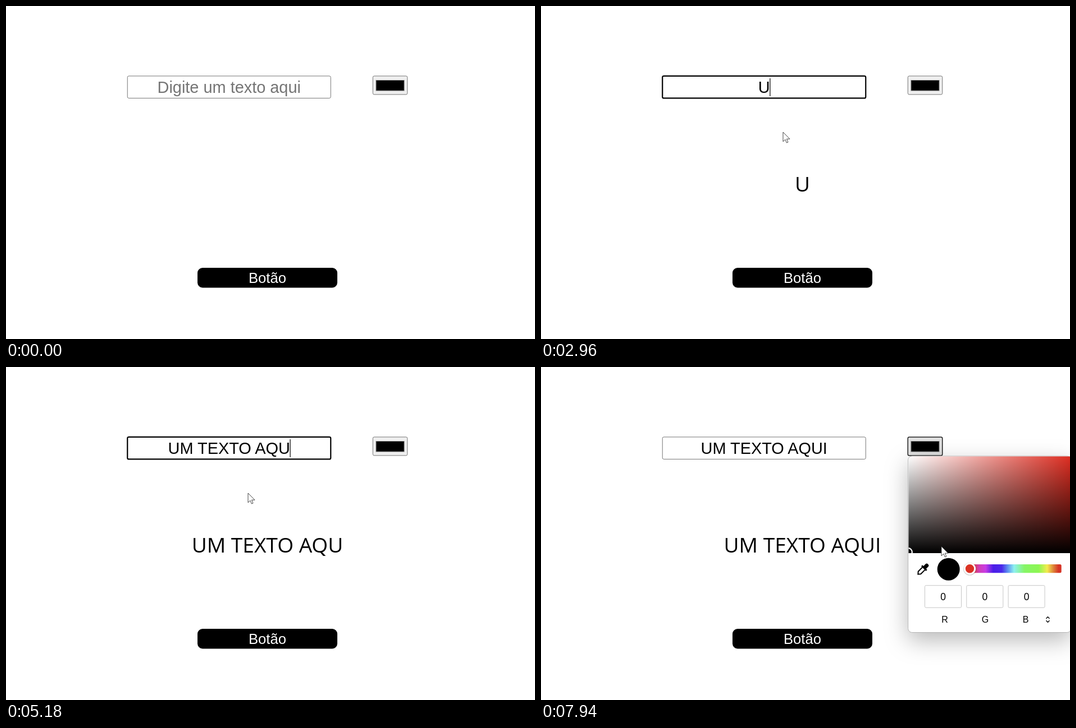
An HTML page for the animation above (8000 ms loop, 942 by 594 pixels).

```html
<!DOCTYPE html>
<html lang="pt">
<head>
<meta charset="utf-8">
<title>Texto e cor</title>
<style>
  html, body { margin: 0; width: 100%; height: 100%; overflow: hidden; background: #fff; }
  svg { display: block; width: 942px; height: 594px; }
  text { font-family: "Liberation Sans", Arial, sans-serif; text-anchor: middle; white-space: pre; }
  #value { font-size: 28.9px; }
  #output { font-family: "Open Sans", "Segoe UI", sans-serif; font-size: 37.1px; }
  .digit { font-size: 17.5px; }
  .label { font-size: 16px; }
  .panel { filter: drop-shadow(0 14px 20px rgba(0, 0, 0, .28)); }
</style>
</head>
<body>
<svg viewBox="0 0 942 594">
  <defs>
    <linearGradient id="sat">
      <stop stop-color="#fff"/><stop offset="1" stop-color="#de2e22"/>
    </linearGradient>
    <linearGradient id="dark" x2="0" y2="1">
      <stop stop-color="#000" stop-opacity="0"/><stop offset="1" stop-color="#000"/>
    </linearGradient>
    <linearGradient id="hue">
      <stop offset=".06" stop-color="#d93a2c"/>
      <stop offset=".13" stop-color="#d03fb4"/>
      <stop offset=".2" stop-color="#c83ce6"/>
      <stop offset=".28" stop-color="#4a1de8"/>
      <stop offset=".37" stop-color="#4a28ea"/>
      <stop offset=".43" stop-color="#5c8cf0"/>
      <stop offset=".5" stop-color="#8ef0f0"/>
      <stop offset=".61" stop-color="#86f566"/>
      <stop offset=".76" stop-color="#8cf652"/>
      <stop offset=".85" stop-color="#f3ec4e"/>
      <stop offset=".92" stop-color="#dd7c38"/>
      <stop offset=".97" stop-color="#d63426"/>
    </linearGradient>
    <clipPath id="area"><path d="M654.5 332V166q0-6.500 6.500-6.500H943V332z"/></clipPath>
  </defs>

  <rect id="field" x="216.250" y="124.900" width="362" height="39.500" rx="2.500" fill="#fff"/>
  <text id="value" x="397.250" y="155"></text>
  <rect id="caret" y="129" width="1.200" height="32"/>

  <rect id="well" x="653.250" y="124.900" width="61.500" height="33" rx="2.500"/>
  <rect x="659" y="132.500" width="50" height="18.500" stroke="#777"/>

  <text id="output" x="465.500" y="331.300"></text>

  <rect x="341" y="467" width="249" height="35.500" rx="9"/>
  <text x="465.500" y="493.700" font-size="25.600" fill="#fff">Botão</text>

  <g id="picker">
    <rect class="panel" x="653.700" y="159" width="290" height="314.500" rx="7" fill="#fff"/>
    <rect x="653.700" y="159" width="290" height="314.500" rx="7" fill="#fff" stroke="#b4b4b4"/>
    <g clip-path="url(#area)">
      <rect x="654" y="159" width="289" height="173" fill="url(#sat)"/>
      <rect x="654" y="159" width="289" height="173" fill="url(#dark)"/>
      <circle cx="654" cy="330" r="6.800" fill="none" stroke="#fff" stroke-width="2.200"/>
    </g>
    <g transform="translate(680 361) rotate(45)">
      <path d="M-3.200 -2V8.500L0 12.200L3.200 8.500V-2" fill="#fff" stroke="#000" stroke-width="2"/>
      <path d="M-6 -4.800H6V-1.800H-6zM-3.400 -4.500V-10q0-3 3.400-3t3.400 3V-4.500z"/>
    </g>
    <circle cx="725.700" cy="360.700" r="20"/>
    <rect x="758" y="352" width="168.700" height="15.300" rx="2.500" fill="url(#hue)"/>
    <circle cx="763.500" cy="360.300" r="11.500" fill="#000" opacity=".18"/>
    <circle cx="763.500" cy="359.700" r="9.200" fill="#da3223" stroke="#fff" stroke-width="3"/>
    <g id="channels"></g>
    <path d="M899.500 448.700L902.500 445.700L905.500 448.700M899.500 452.300L902.500 455.300L905.500 452.300" fill="none" stroke="#000" stroke-width="1.400"/>
  </g>

  <circle id="click" r="12" fill="#f5ef31" opacity=".88"/>
  <g id="mouse">
    <path id="arrow" d="M0 0V16.800L3.900 13.200L6.400 19L8.900 18L6.500 12.200H12z" fill="#fff" stroke="#333" stroke-width=".9"/>
    <path id="beam" d="M-4.500 -7.500H-1.500L0 -6.500L1.500 -7.500H4.500M-4.500 8H-1.500L0 7L1.500 8H4.500M0 -6.500V7" fill="none" stroke="#222" stroke-width="1.200"/>
  </g>
</svg>
<script>
const LOOP = 8000;
const PHRASE = 'UM TEXTO AQUI';
const KEYS = [2960, 3090, 3220, 3360, 3620, 3890, 4160, 4220, 4360, 4490, 4780, 5180, 5440];
const FOCUS = 1760, BLUR = 6895, BLINK = 530;

const $ = id => document.getElementById(id);
const show = (id, on) => $(id).setAttribute('visibility', on ? 'visible' : 'hidden');
const set = (id, attrs) => {
  for (const k in attrs) $(id).setAttribute(k, attrs[k]);
};
const clamp = v => Math.min(1, Math.max(0, v));
const between = (v, a, b) => v >= a && v < b;

const outQuad = p => p * (2 - p);
const inOut = p => p * p * (3 - 2 * p);

// Each move: start, end, easing, then a quadratic curve
const MOVES = [
  [930, 1690, inOut, [829, 322], [620, 240], [465, 152]],
  [1850, 2280, outQuad, [465, 152], [452, 200], [431, 225]],
  [5985, 6740, inOut, [431, 225], [500, 245], [667, 141]],
  [7510, 7940, inOut, [667, 141], [676, 235], [713, 320]]
];

function mouseAt(t) {
  const move = MOVES.filter(m => t >= m[0]).pop() || MOVES[0];
  const [start, end, ease, a, b, c] = move;
  const p = ease(clamp((t - start) / (end - start))), q = 1 - p;
  return a.map((v, i) => q * q * v + 2 * q * p * b[i] + p * p * c[i]);
}

$('channels').innerHTML = ['R', 'G', 'B'].map((name, i) => {
  const x = 683.5 + i * 74.300;
  return `<rect x="${x}" y="389.700" width="65" height="39.500" rx="2" fill="#fff" stroke="#c6c6c6"/>
    <text class="digit" x="${x + 32.500}" y="415.500">0</text>
    <text class="label" x="${719 + i * 72}" y="456">${name}</text>`;
}).join('');

function drawField(t) {
  const count = KEYS.filter(k => t >= k).length;
  const typed = PHRASE.slice(0, count);
  const focused = between(t, FOCUS, BLUR);
  const value = $('value');
  const text = typed || 'Digite um texto aqui';
  if (value.textContent !== text) {
    value.textContent = text;
    $('output').textContent = typed.trim();
  }
  value.setAttribute('fill', typed ? '#000' : '#757575');
  set('field', { stroke: focused ? '#000' : '#767676', 'stroke-width': focused ? 2.2 : 1 });

  const since = t - (count ? KEYS[count - 1] : FOCUS);
  const half = typed ? value.getComputedTextLength() / 2 - 0.4 : 0;
  show('caret', focused && Math.floor(since / BLINK) % 2 === 0);
  set('caret', { x: 397.25 + half });
}

function drawMouse(t) {
  const [x, y] = mouseAt(t);
  const inField = between(x, 216, 579) && between(y, 124, 165);
  const inWell = between(x, 653, 715) && between(y, 124, 158);
  const shown = t >= 960;
  set('mouse', { transform: `translate(${x} ${y})` });
  show('arrow', shown && !inField);
  show('beam', shown && inField);
  set('click', { cx: x - 0.5, cy: y });
  show('click', between(t, 1730, 1870) || between(t, 6830, 6960));

  const open = t >= BLUR;
  set('well', {
    fill: open ? '#e0e0e0' : inWell && shown ? '#e5e5e5' : '#efefef',
    stroke: open ? '#222' : inWell && shown ? '#4f4f4f' : '#767676',
    'stroke-width': open ? 1.5 : 1
  });
}

function draw(t) {
  drawField(t);
  drawMouse(t);
  show('picker', t >= BLUR);
  set('picker', { opacity: clamp(0.4 + (t - BLUR) / 200) });
}

let begin;
function tick(now) {
  begin ??= now;
  draw((now - begin) % LOOP);
  requestAnimationFrame(tick);
}
draw(0);
requestAnimationFrame(tick);
</script>
</body>
</html>
```
